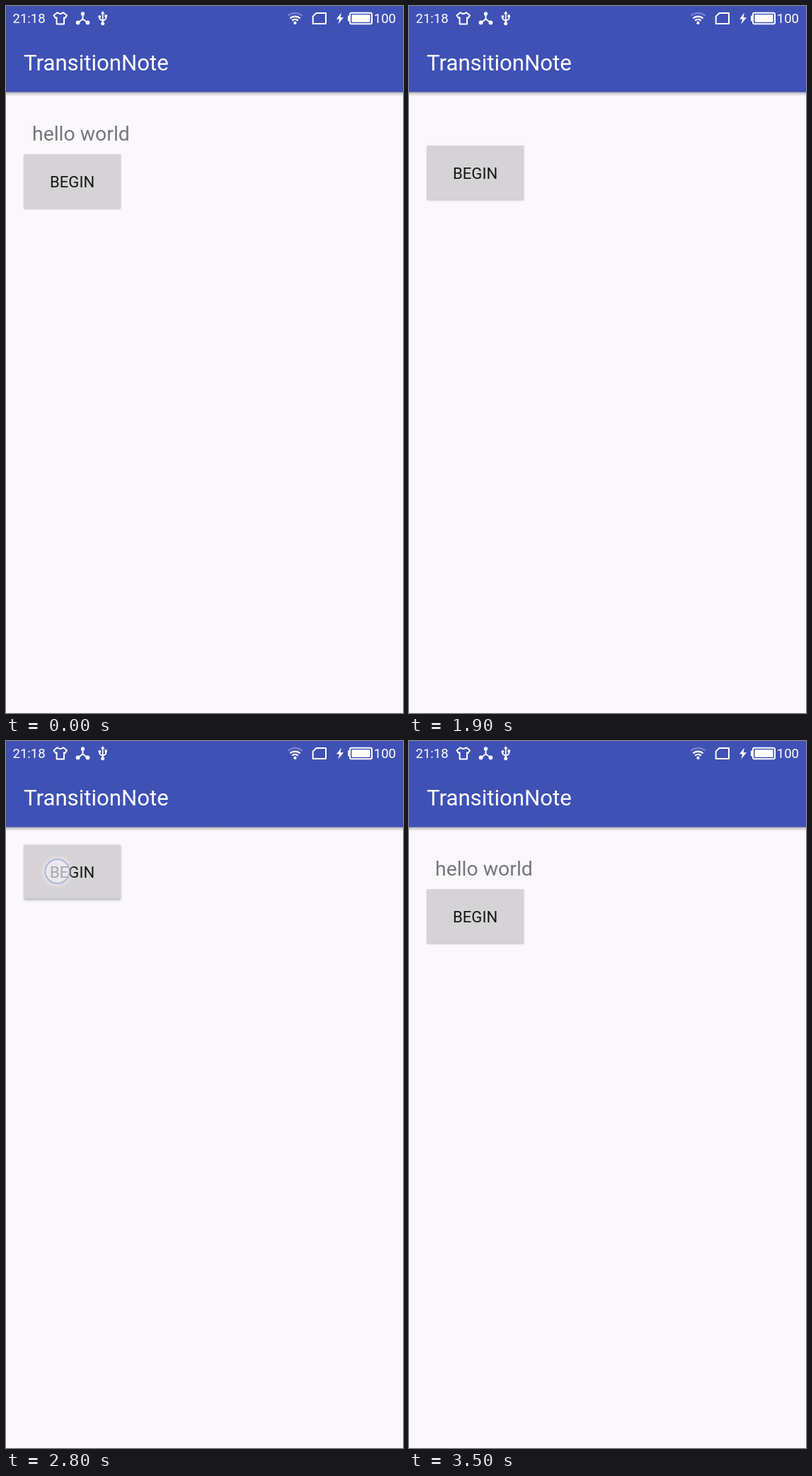
These frames come from a looping animation (561 px wide and 998 px high, 3.6 s). An HTML page:

```html
<!DOCTYPE html>
<html lang="en">
<head>
<meta charset="utf-8">
<title>Transition demo</title>
<style>
  html, body { margin: 0; width: 100%; height: 100%; overflow: hidden; background: #faf8fb; }
  svg { display: block; width: 561px; height: 998px; }
  text { font-family: Roboto, "Noto Sans", sans-serif; }
</style>
</head>
<body>
<svg viewBox="0 0 561 998" xmlns="http://www.w3.org/2000/svg">
  <defs>
    <linearGradient id="barShadow" x2="0" y2="1">
      <stop offset="0" stop-color="#000" stop-opacity=".36"/>
      <stop offset=".4" stop-color="#000" stop-opacity=".16"/>
      <stop offset="1" stop-color="#000" stop-opacity="0"/>
    </linearGradient>
    <filter id="soft" x="-20%" y="-20%" width="140%" height="140%">
      <feGaussianBlur id="blur" stdDeviation="1"/>
    </filter>
    <filter id="glow" x="-50%" y="-50%" width="200%" height="200%">
      <feGaussianBlur stdDeviation="2"/>
    </filter>
  </defs>

  <rect width="561" height="998" fill="#faf8fb"/>
  <rect y="121" width="561" height="6.5" fill="url(#barShadow)"/>
  <rect width="561" height="121.5" fill="#3f51b5"/>

  <g fill="#fff">
    <text x="9.5" y="23.7" font-size="18.5">21:18</text>
    <text x="519.8" y="23.7" font-size="18.5">100</text>
    <text x="25" y="90.6" font-size="31.2">TransitionNote</text>
  </g>

  <g fill="none" stroke="#fff" stroke-width="2" stroke-linejoin="round">
    <path d="M72.5 9.3Q76.8 12.6 81 9.3L86 13.2L83.6 17L82 16.3V25.6H71.6V16.3L70 17L67.5 13.2Z"/>
    <path d="M108.5 10V18.5L101.5 23.5M108.5 18.5L115.5 23.5"/>
    <path d="M136.7 10V24M132.3 15V18.3L136.7 21.3L141.2 18.3V14" stroke-width="1.8"/>
    <g stroke-width="2.4">
      <path d="M398.4 13.8A15.5 15.5 0 0 1 418.6 13.8" stroke="#7481cb"/>
      <path d="M401.4 17.3A11 11 0 0 1 415.6 17.3"/>
      <path d="M404.3 20.6A6.5 6.5 0 0 1 412.7 20.6"/>
    </g>
    <path d="M438.5 10H452V25H433.7V14.6Z"/>
    <rect x="486" y="9.8" width="31" height="15.4" rx="2"/>
    <g fill="#fff" stroke="none">
      <circle cx="108.5" cy="11" r="2.7"/>
      <circle cx="101.6" cy="23.4" r="2.9"/>
      <circle cx="115.4" cy="23.4" r="2.9"/>
      <path d="M136.7 7L139.6 11.3H133.8Z"/>
      <circle cx="136.7" cy="24.7" r="2.5"/>
      <circle cx="132.3" cy="15" r="1.9"/>
      <rect x="139.4" y="12.4" width="3.6" height="3.6"/>
      <circle cx="408.5" cy="23.9" r="2.1"/>
      <path d="M473.8 9.5L467 18.4H471.2L469.4 25.5L477 16.2H472.6Z"/>
      <rect x="483" y="13.6" width="2.4" height="7.8"/>
      <rect x="488.5" y="12.2" width="26" height="10.6"/>
    </g>
  </g>

  <text id="label" x="37" y="189.7" font-size="28.4" fill="#77767a">hello world</text>

  <g id="button">
    <rect id="shadow" x="25.5" width="136.5" height="76" filter="url(#soft)"/>
    <rect id="face" x="25" width="137.3" height="76.2"/>
    <text x="93.6" y="46.7" font-size="22.1" text-anchor="middle" fill="#161616">BEGIN</text>
  </g>

  <g id="touch">
    <circle r="19" fill="none" stroke="#fff" stroke-opacity=".5" stroke-width="3" filter="url(#glow)"/>
    <circle r="17" fill="#f6f5fb" fill-opacity=".65" stroke="#a3acd6" stroke-opacity=".8" stroke-width="2"/>
  </g>
</svg>
<script>
const LOOP = 3600, TICK = 100, DURATION = 300;
const LOW = 209.2, HIGH = 146.4;
const HIDE = 1513, SHOW = 2829;
const $ = id => document.getElementById(id);

function set(id, attrs) {
  for (const name in attrs) $(id).setAttribute(name, attrs[name]);
}

// Accelerate-decelerate progress of a transition that begins at `start`.
function ease(time, start) {
  const p = Math.min(1, Math.max(0, (time - start) / DURATION));
  return (1 - Math.cos(Math.PI * p)) / 2;
}

const within = (time, from, to) => time >= from && time < to;

function faceColor(time) {
  const rippling = within(time, 1500, 1700) || within(time, 2900, 3100);
  return rippling ? "#d0ced1" : "#d5d3d6";
}

function render(time) {
  // Fade out, then slide up; later slide down, then fade in.
  const fade = 1 - ease(time, HIDE) + ease(time, SHOW + DURATION);
  const raised = ease(time, HIDE + DURATION) - ease(time, SHOW);
  const firstTap = within(time, 1400, 1600), secondTap = within(time, 2800, 2900);
  const lifted = within(time, 1500, 1600) || secondTap;

  set("label", { opacity: fade });
  set("button", { transform: `translate(0 ${LOW + (HIGH - LOW) * raised})` });
  set("face", { fill: faceColor(time) });
  set("shadow", { y: lifted ? 2.2 : 1.2, opacity: lifted ? .28 : .26 });
  set("blur", { stdDeviation: lifted ? 1.7 : .8 });
  set("touch", {
    visibility: firstTap || secondTap ? "visible" : "hidden",
    transform: firstTap ? "translate(71.7 239.3)" : "translate(72.5 184)"
  });
}

const begin = performance.now();
function tick() {
  const elapsed = (performance.now() - begin) % LOOP;
  render(Math.floor(elapsed / TICK) * TICK);
  requestAnimationFrame(tick);
}
tick();
</script>
</body>
</html>
```
